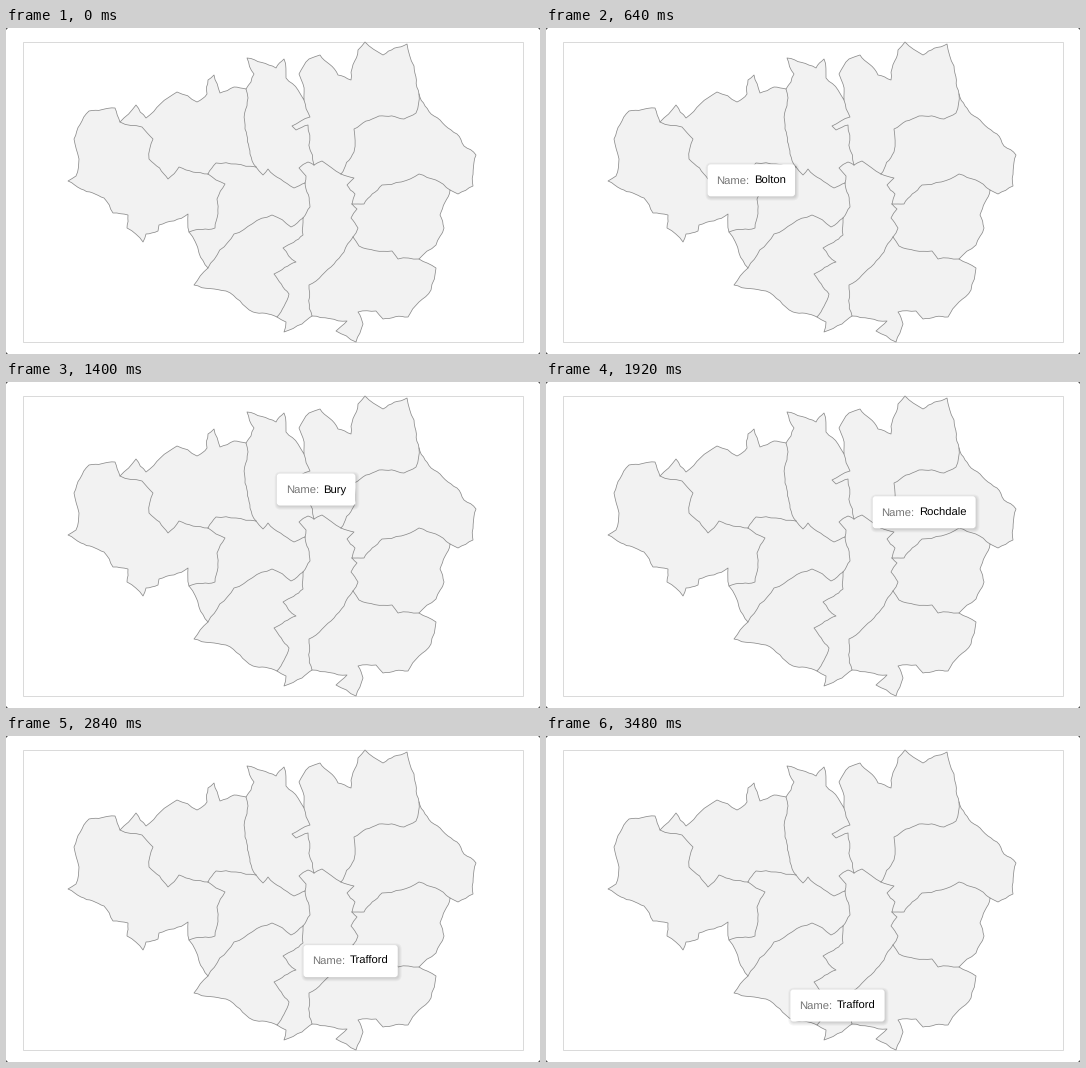
A matplotlib script for the animation above (4400 ms loop, 534 by 326 pixels).

```python
import math
import random

import matplotlib.pyplot as plt
import numpy as np
from matplotlib.animation import FuncAnimation
from matplotlib.patches import FancyBboxPatch, Polygon, Rectangle

W, H, DPI = 534, 326, 100
STEP, LOOP = 40, 4400
PX = 72 / DPI
FILL, LINE = "#f2f2f2", "#8a8a8a"

plt.rcParams["font.family"] = "Liberation Sans"
plt.rcParams["text.hinting"] = "none"

rng = random.Random(4)


def rough(a, b):
    """Points from a up to b, split at shifted midpoints until short."""
    dx, dy = b[0] - a[0], b[1] - a[1]
    if math.hypot(dx, dy) < 6:
        return [a]
    k = rng.uniform(-0.07, 0.07)
    mid = ((a[0] + b[0]) / 2 - k * dy, (a[1] + b[1]) / 2 + k * dx)
    return rough(a, mid) + rough(mid, b)


def border(*keys):
    line = []
    for a, b in zip(keys, keys[1:]):
        line += rough(a, b)
    return line + [keys[-1]]


# Points where three areas meet, on the coast and inland
wigan_bolton, bolton_bury = (114, 94), (240, 61)
bury_rochdale, rochdale_oldham = (298, 72), (413, 66)
oldham_tameside, tameside_stockport = (444, 162), (413, 231)
stockport_manchester, manchester_trafford = (306, 288), (271, 289)
trafford_salford, salford_wigan = (202, 240), (183, 204)
west, north, hub, peak = (202, 146), (250, 139), (299, 155), (308, 137)
moor, east, south, heart = (335, 146), (346, 176), (347, 209), (297, 190)

coast = [
    border(salford_wigan, (182, 186), (153, 197), (152, 203), (140, 206), (137, 214),
           (121, 200), (122, 187), (107, 185), (98, 170), (75, 161), (62, 153),
           (70, 148), (73, 131), (68, 111), (83, 83), (109, 80), wigan_bolton),
    border(wigan_bolton, (130, 77), (140, 90), (171, 64), (191, 74), (201, 66),
           (202, 52), (208, 47), (214, 65), (228, 59), bolton_bury),
    border(bolton_bury, (248, 46), (241, 30), (270, 40), (278, 31), (280, 50),
           (292, 62), bury_rochdale),
    border(bury_rochdale, (297, 56), (293, 46), (303, 31), (314, 27), (332, 47),
           (345, 52), (352, 22), (359, 14), (377, 27), (401, 16), (408, 38),
           rochdale_oldham),
    border(rochdale_oldham, (428, 88), (451, 106), (458, 118), (470, 127),
           (467, 158), (452, 166), oldham_tameside),
    border(oldham_tameside, (434, 187), (438, 200), (430, 217), tameside_stockport),
    border(tameside_stockport, (430, 240), (425, 262), (413, 274), (402, 289),
           (377, 291), (370, 283), (352, 284), (357, 296), (350, 314), (330, 303),
           (341, 293), stockport_manchester),
    border(stockport_manchester, (296, 296), (278, 304), (280, 294),
           manchester_trafford),
    border(manchester_trafford, (247, 284), (220, 263), (188, 257), trafford_salford),
    border(trafford_salford, (193, 225), salford_wigan),
]
inland = [
    border(wigan_bolton, (136, 99), (147, 111), (143, 131), (162, 151), (173, 139), west),
    border(west, (219, 156), (211, 171), (209, 200), salford_wigan),
    border(west, (210, 135), (230, 136), north),
    border(bolton_bury, (242, 70), (239, 101), (244, 126), north),
    border(north, (257, 147), (262, 141), (288, 160), hub),
    border(hub, (300, 148), (293, 140), (302, 134), peak),
    border(bury_rochdale, (304, 89), (286, 98), (290, 102), (302, 97), peak),
    border(peak, (316, 133), moor),
    border(moor, (348, 124), (348, 101), (373, 88), (398, 91), (410, 85), rochdale_oldham),
    border(moor, (348, 150), (341, 157), (349, 166), east),
    border(east, (358, 176), (376, 157), (413, 146), oldham_tameside),
    border(east, (351, 181), (345, 190), (352, 200), south),
    border(south, (353, 218), (386, 223), (392, 231), tameside_stockport),
    border(south, (338, 224), (328, 236), (303, 257), stockport_manchester),
    border(hub, (304, 179), heart),
    border(heart, (285, 199), (266, 187), (228, 206), trafford_salford),
    border(heart, (297, 207), (277, 220), (290, 234), (268, 246), (283, 266),
           manchester_trafford),
]

fig = plt.figure(figsize=(W / DPI, H / DPI), dpi=DPI, facecolor="white")
ax = fig.add_axes([0, 0, 1, 1])
ax.set_xlim(0, W)
ax.set_ylim(H, 0)
ax.axis("off")

ax.add_patch(Rectangle((17.5, 14.5), 500, 300, fill=False, ec="#dadada", lw=PX,
                       snap=False))
for cx, sx in ((0, 1), (W, -1)):
    for cy, sy in ((0, 1), (H, -1)):
        ax.add_patch(Polygon([(cx, cy), (cx + 2 * sx, cy), (cx, cy + 2 * sy)],
                             fc="#555555", lw=0))

outline = [p for part in coast for p in part[:-1]]
ax.add_patch(Polygon(outline, fc=FILL, ec=LINE, lw=0.75 * PX, joinstyle="round"))
for line in inland:
    ax.plot(*zip(*line), color=LINE, lw=0.75 * PX, solid_joinstyle="round")

# Tooltip corner at every half of a district's visit
VISIT = 560
STOPS = np.array([(90, 222), (121, 184), (150, 146), (193, 115), (234, 95), (270.5, 91.5),
                  (301, 95), (329, 118), (332, 147), (325, 175), (302, 204), (264, 241),
                  (246, 252.5), (244, 253)])
SLOPES = np.gradient(STOPS, axis=0)
NAMES = ["Wigan", "Bolton", "Bury", "Rochdale", "Manchester", "Trafford"]
APPEAR, REST = 200, 3480


def spot(t):
    """Cubic Hermite position along the stops."""
    i, u = divmod(min(t, REST) / (VISIT / 2), 1)
    i = int(i)
    return ((1 + 2 * u) * (1 - u) ** 2 * STOPS[i] + u * (1 - u) ** 2 * SLOPES[i]
            + u * u * (3 - 2 * u) * STOPS[i + 1] + u * u * (u - 1) * SLOPES[i + 1])


def box(**style):
    return ax.add_patch(FancyBboxPatch((0, 0), 10, 10, lw=0, zorder=5, **style))


def place(patch, x, y, w, h, r):
    patch.set_boxstyle("round", pad=0, rounding_size=r)
    patch.set_bounds(x, y, w, h)


GROWTH = (3, 2, 1, 0.2)
shadows = [box(fc="black", alpha=0.035) for _ in GROWTH]
card = box(fc="white")
FONT = dict(fontsize=11.2 * PX, va="baseline", ha="left", zorder=6)
label = ax.text(0, 0, "Name:", color="#757575", **FONT)
value = ax.text(0, 0, "", color="black", **FONT)
tooltip = [*shadows, card, label, value]


def card_width(name):
    value.set_text(name)
    return value.get_window_extent().width + 55.5


WIDTHS = {name: card_width(name) for name in NAMES}


def update(frame):
    t = frame * STEP
    shown = t >= APPEAR
    for part in tooltip:
        part.set_visible(shown)
    if shown:
        x, y = spot(t)
        name = NAMES[min((t - STEP // 2) // VISIT, len(NAMES) - 1)]
        w = WIDTHS[name]
        for patch, g in zip(shadows, GROWTH):
            place(patch, x + 1.2 - g, y + 1.2 - g, w + 2 * g, 32 + 2 * g, 3 + g)
        place(card, x + 0.3, y, w, 32, 3)
        label.set_position((x + 9.2, y + 19.2))
        value.set_position((x + 46.7, y + 19.2))
        value.set_text(name)
    return tooltip


anim = FuncAnimation(fig, update, frames=LOOP // STEP, interval=STEP,
                     repeat=True, repeat_delay=0, blit=False)
plt.show()
```
